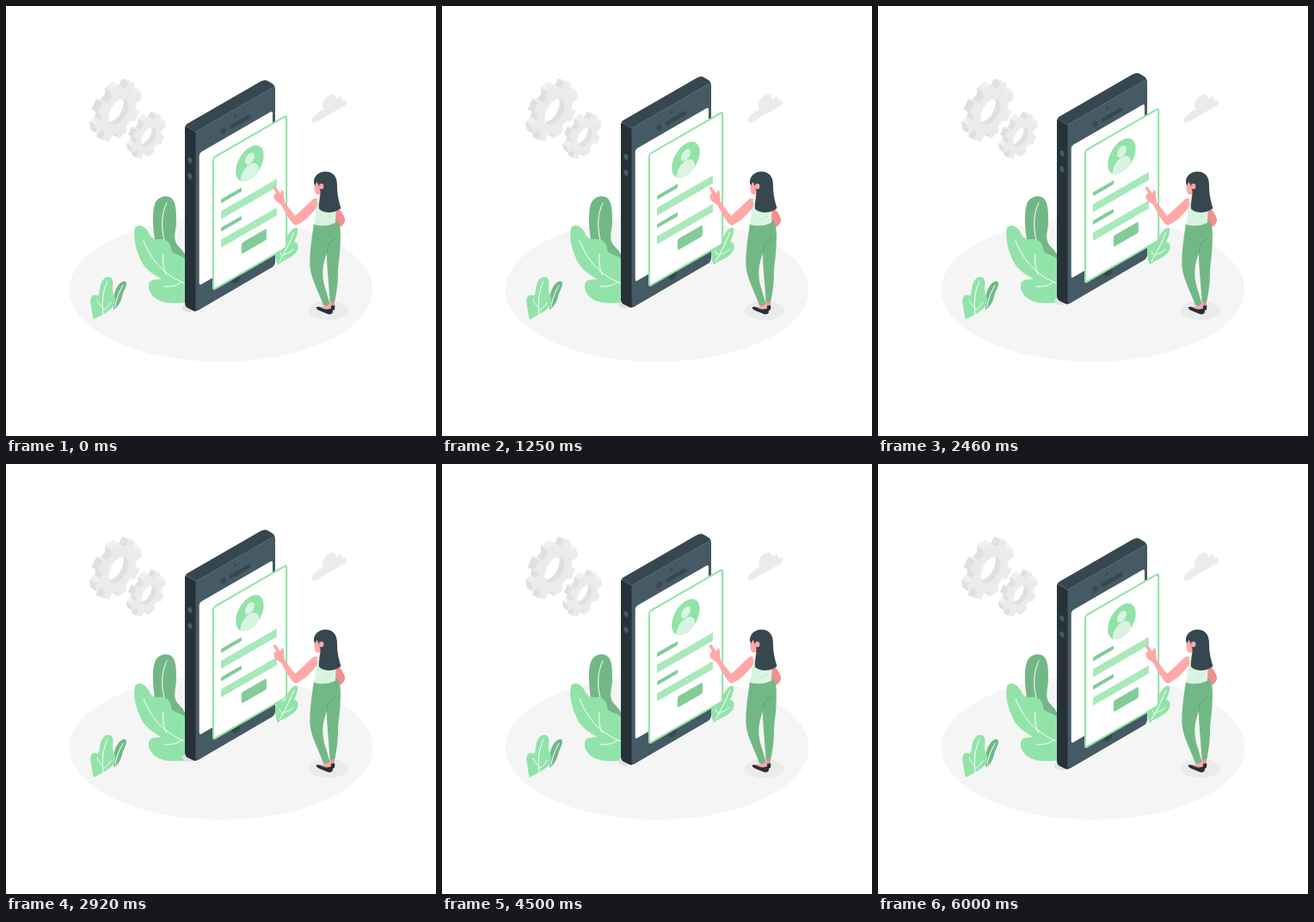
Recreate the animation shown at these times as an HTML page. Size 500 px wide and 500 px high, loop 6040 ms.

```html
<!DOCTYPE html>
<html lang="en">
<head>
<meta charset="utf-8">
<title>Floating phone form</title>
<style>
html, body { margin: 0; width: 100%; height: 100%; overflow: hidden; background: #fff; }
svg { display: block; width: 100%; height: 100%; }
.dark { fill: #263238; }
.steel { fill: #37474f; }
.slate { fill: #455a64; }
.mint { fill: #92e3a9; }
.pale { fill: #d9f5e1; }
.leaf { fill: #72b886; }
.mid { fill: #83cc98; }
.skin { fill: #ffa8a7; }
.blush { fill: #f28f8f; }
.grey { fill: #ebebeb; }
.vein { fill: none; stroke: #fff; stroke-width: 1; stroke-linecap: round; }
</style>
</head>
<body>
<svg viewBox="0 0 500 500">
  <defs>
    <clipPath id="avatar"><circle cx="49" cy="31" r="18.8"/></clipPath>
  </defs>

  <!-- floor -->
  <ellipse cx="250" cy="330" rx="176.5" ry="83.5" fill="#f5f5f5"/>
  <ellipse class="grey" cx="375" cy="354" rx="23" ry="11"/>

  <g id="gears"></g>
  <path class="grey" d="M357 136C354 133 357 128 362 125C363 122 366 121 369 121C367 116 368 110 373 106C378 101 384 102 384 109C387 104 392 104 391 110C395 108 398 111 395 115Q393 117 390 118L362 134Q359 136 357 136Z"/>

  <!-- tall plant -->
  <path class="leaf" d="M173 272C170 252 170 236 174 228C178 221 188 219 193 224C198 229 198 240 198 250C198 260 194 268 198 276C201 281 206 283 209 291V295L190 292Z"/>
  <path class="vein" d="M187 229C181 241 180 256 184 272"/>
  <path class="mint" d="M150 258C153 253 161 255 165 262C169 270 172 272 178 271C187 270 192 276 192 283C192 288 200 288 209 294V345C195 346 182 346 174 340C167 335 164 327 167 321C170 317 177 319 180 317C172 313 162 306 158 298C152 286 147 270 150 258Z"/>
  <path class="vein" d="M160 273C168 293 181 312 209 323M183 288C182 297 183 305 186 312M184 326C192 327 199 325 204 321"/>

  <!-- small plants -->
  <path class="leaf" d="M125 353C126 345 124 335 129 327C133 320 139 318 140 322C140 328 136 332 135 338C133 345 130 350 125 353Z"/>
  <path class="vein" d="M136 325C131 333 128 342 127 350"/>
  <path class="mint" d="M102 364.5C100 358 100 355 99 349C97 341 99 335 104 336C108 338 108 336 109 330C110 320 114 315 119 315C125 315 125 322 124 329C123 334 128 337 127 344C126 353 112 359 102 364.5Z"/>
  <path class="vein" d="M118 320C113 330 111 344 113 360M106 342C108 347 110 349 113 351M122 345C119 350 116 352 113 354"/>
  <path class="mint" d="M316 301C313 295 312 285 314 279C317 274 325 278 326 272C328 264 334 257 338 258C341 260 338 268 335 274C341 275 341 283 336 288C331 294 322 295 316 301Z"/>
  <path class="vein" d="M335 263C330 274 325 286 318 297M334 283C330 287 326 288 323 289M318 285C319 287 320 289 322 291"/>

  <g id="phone">
    <ellipse cx="213" cy="351" rx="8" ry="5" fill="#e0e0e0"/>
    <path class="steel" d="M208 143Q208 138.500 211 136.800L296 87.800Q301 84.800 305 87.500L310 90.500Q313 92.500 313 98L221 152Z"/>
    <path class="dark" d="M208 142Q208 139.500 210 140L221 146.500L226 352Q221 356 218 354.500L211 351Q208 349 208 345Z"/>
    <path class="slate" d="M220.500 146.500L309 95.500Q313 93.500 313 98V297Q313 301.500 309 304L225 353Q220.500 355.500 220.500 351Z"/>
    <path d="M209 139.500L220.700 146.300L311 94.300" fill="none" stroke="#7b8b93" stroke-width=".5"/>
    <rect width="98.5" height="154" rx="3" fill="#fff" transform="matrix(.866 -.5 0 1 224.700 171)"/>
    <g class="steel">
      <ellipse cx="252.5" cy="145.5" rx="2.8" ry="4" transform="rotate(20 252.5 145.5)"/>
      <ellipse cx="266.7" cy="127.5" rx="1.4" ry="1.8"/>
      <path d="M262 140.5L282.5 128.5" stroke="#37474f" stroke-width="4.4" stroke-linecap="round"/>
      <ellipse cx="267" cy="316" rx="5.5" ry="6.5" transform="rotate(25 267 316)"/>
    </g>
    <g class="slate">
      <ellipse cx="214" cy="179.5" rx="2.5" ry="3.6" transform="rotate(-20 214 179.5)"/>
      <ellipse cx="214" cy="198" rx="2.5" ry="3.6" transform="rotate(-20 214 198)"/>
    </g>
    <g transform="matrix(.866 -.5 0 1 241 176.500)">
      <rect width="98.3" height="153.5" rx="3" fill="#fff" stroke="#92e3a9" stroke-width="2.4"/>
      <circle class="mint" cx="49" cy="31" r="18.8"/>
      <g class="pale" clip-path="url(#avatar)">
        <circle cx="49" cy="25.5" r="6.3"/>
        <circle cx="49" cy="44.5" r="12.5"/>
      </g>
      <g fill="#a8e9ba">
        <rect x="10.4" y="67.3" width="75" height="9.3"/>
        <rect x="10.4" y="100.5" width="75" height="9.3"/>
      </g>
      <g class="mid">
        <rect x="10.4" y="53.5" width="27.7" height="4.6" rx="1"/>
        <rect x="10.4" y="86.5" width="27.7" height="4.6" rx="1"/>
        <rect x="38" y="118" width="33.5" height="13" rx="2"/>
      </g>
    </g>
  </g>

  <!-- woman -->
  <path class="blush" d="M383 233C387 234 391 240 394 247C395 252 391 256 386 259L382 255V236Z"/>
  <path class="blush" d="M377 340H382V350H376Z"/>
  <path class="dark" d="M376 349L382 348Q383 352 381 354L376 354Z"/>
  <path class="skin" d="M371 345H378V352Q371 355 365 350L371 349Z"/>
  <path class="dark" d="M361 350Q364 349 367 351Q372 354 377 352Q380 352 380 355Q380 359 375 358.5L364 354Q360 352 361 350Z"/>
  <path class="leaf" d="M358 253L386 250C390 258 389 270 388.500 281C388 294 386 301 386 312C386 324 384 334 382.500 343Q379 345 376.500 343C376 328 373 305 373 288C368 300 367 312 370 324L376.500 346Q373 350 369 348C364 333 357 322 354 307C352 294 355 273 358 253Z"/>
  <path d="M384 271C377 273 374 277 373.500 285" fill="none" stroke="#5d9c70" stroke-width=".9"/>
  <path class="skin" d="M358 224C364 223 366 228 362 234C355 242 346 252 337 255C332 254 326 242 320 231L314 227C310 223 311 219 314 218L310.500 211Q312 209 314 211L319 218L321 214Q323 214 323 219L324 228L336 244C343 239 350 230 358 224Z"/>
  <path class="skin" d="M360 202C358 208 358 214 360 218Q362 220 365 219L364 226L378 228V205L365 198Z"/>
  <path class="pale" d="M361 226C366 222 373 222 381 228C385 236 383 244 383 252Q371 258 358 254C359 247 361 241 360 236C363 232 363 229 361 226Z"/>
  <path d="M372 248L379 244" fill="none" stroke="#a8e9ba" stroke-width=".9"/>
  <path class="steel" d="M358 206C357 198 364 192.500 371 192.500C380 192.500 385 198 385 208C385 219 387 227 389.500 235C383 241 370 242 364 236C363 228 367 219 365 213L362 205Q360 205 360 209Z"/>
  <ellipse class="skin" cx="366.7" cy="209.8" rx="2.7" ry="3.3"/>
</svg>
<script>
const phone = document.getElementById('phone');
const gears = document.getElementById('gears');

// Point on a circle lying in the tilted plane.
function iso(x, y, r, angle) {
  const c = Math.cos(angle) * r;
  return [x + 0.866 * c, y + Math.sin(angle) * r - 0.5 * c];
}

function polygon(points, fill) {
  const d = points.map(p => p.map(v => v.toFixed(1)).join()).join(' ');
  return `<polygon points="${d}" fill="${fill}"/>`;
}

function gear(x, y, outer, root, hole, dx, dy) {
  const rim = [];
  for (let i = 0; i < 8; i++) {
    const mid = (i * 45 - 10) * Math.PI / 180;
    [[-0.25, root], [-0.18, outer], [0.18, outer], [0.25, root]]
      .forEach(([a, r]) => rim.push(iso(x, y, r, mid + a)));
  }
  const back = ([px, py]) => [px + dx, py + dy];
  let art = polygon(rim.map(back), '#e6e6e6');
  rim.forEach((p, i) => {
    const q = rim[(i + 1) % rim.length];
    const nx = q[1] - p[1], ny = p[0] - q[0];
    if (nx * dx + ny * dy > 0) {
      art += polygon([p, q, back(q), back(p)], nx < ny ? '#e0e0e0' : '#f0f0f0');
    }
  });
  const disc = (cx, cy, r, fill) =>
    `<circle r="${r}" transform="matrix(.866 -.5 0 1 ${cx} ${cy})" fill="${fill}"/>`;
  const id = 'hole' + outer;
  art += polygon(rim, '#ebebeb') + disc(x, y, hole, '#e0e0e0');
  art += `<clipPath id="${id}">${disc(x, y, hole, '#000')}</clipPath>`;
  art += `<g clip-path="url(#${id})">${disc(x + dx * 0.85, y + dy * 0.85, hole, '#fff')}</g>`;
  return art;
}

gears.innerHTML = gear(131, 123, 31, 24, 13.5, -7, -4) + gear(166, 152, 23, 17.5, 10, -6, -3.5);

const start = performance.now();
function draw() {
  const t = Math.min((performance.now() - start) % 6040, 6000);
  const lift = 10 * (1 - Math.abs(1 - t / 3000));
  phone.setAttribute('transform', `translate(0 ${-lift})`);
  requestAnimationFrame(draw);
}
draw();
</script>
</body>
</html>
```
